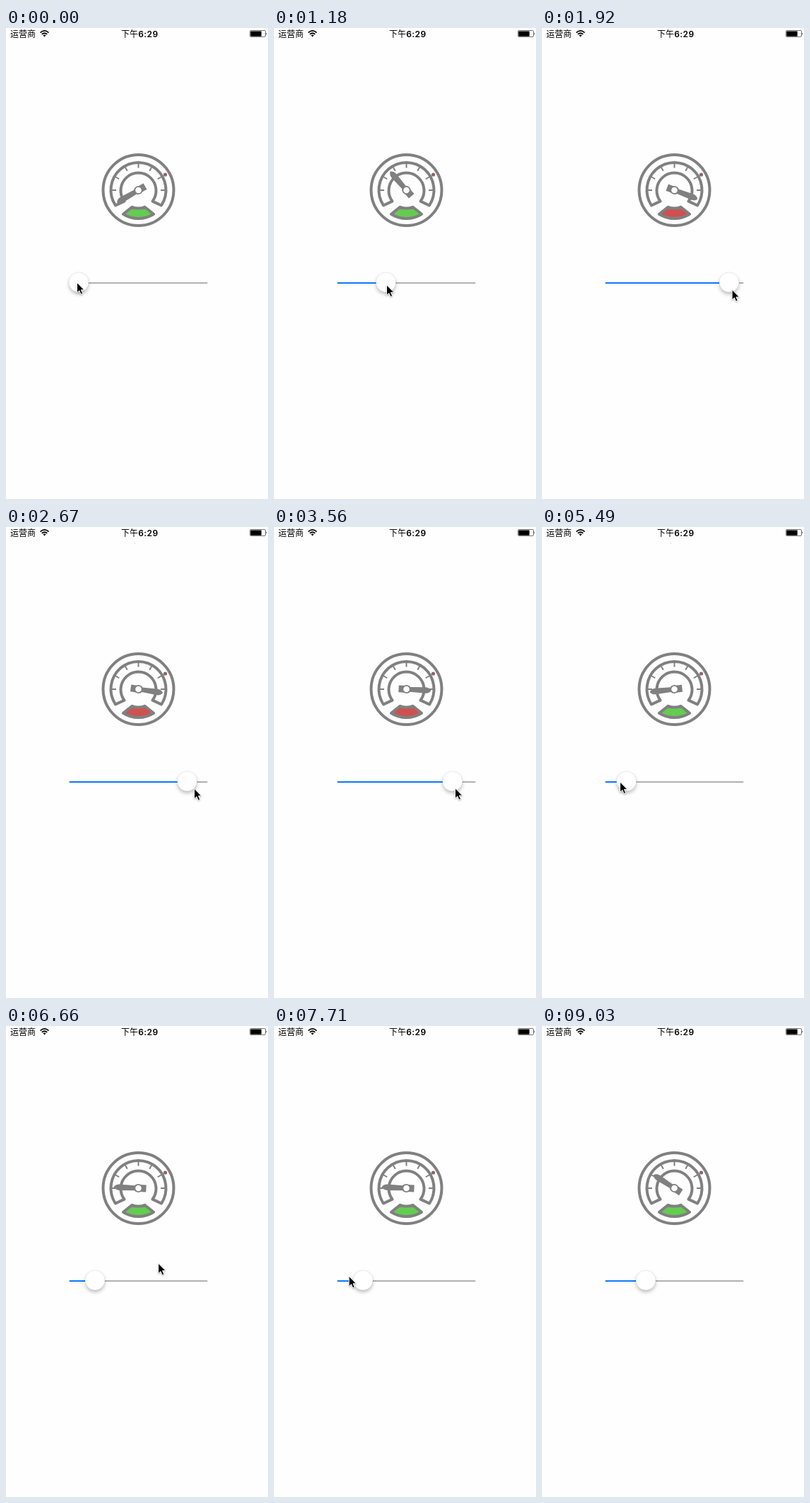
An HTML page that plays this animation: 371 by 665 pixels, repeating every 9650 ms.

```html
<!DOCTYPE html>
<html lang="zh">
<head>
<meta charset="utf-8">
<title>Gauge slider</title>
<style>
  html, body { margin: 0; width: 100%; height: 100%; overflow: hidden; background: #fefefe; }
  svg { display: block; width: 371px; height: 665px; }
  text { font: 12px "Noto Sans CJK SC", "Noto Sans CJK", sans-serif; }
  .time { font-weight: 500; }
  .digits { font: 600 12px Inter, sans-serif; letter-spacing: .4px; }
  .line { fill: none; stroke: #808080; stroke-width: 4; stroke-linejoin: round; }
  #thumb { filter: drop-shadow(0 3px 2.5px rgba(0, 0, 0, .24)); }
  #cursor { filter: drop-shadow(0 1px 1px rgba(0, 0, 0, .3)); }
</style>
</head>
<body>
<svg viewBox="0 0 371 665">
  <rect width="371" height="665" fill="#fefefe"/>

  <text x="6" y="12.5">运营商</text>
  <g fill="none" stroke="#000" stroke-width="1.8">
    <path d="M48.6 6.6Q54.5 1.2 60.4 6.6M50.8 8.9Q54.5 5.6 58.2 8.9"/>
    <path d="M54.5 12.4L52.4 10.3Q54.5 8.6 56.6 10.3Z" fill="#000" stroke="none"/>
  </g>
  <text class="time" x="163" y="12.5">下午</text>
  <text class="digits" x="187.3" y="12.5">6:29</text>
  <rect x="345.5" y="3.5" width="22" height="9" rx="1.5" fill="none" stroke="#555" stroke-width=".8"/>
  <rect x="346.3" y="4.4" width="15.4" height="7.3" rx=".6"/>
  <path d="M368.5 6.3q1.6 1.7 0 3.4z"/>

  <g transform="translate(187.5 229)">
    <circle class="line" r="50"/>
    <path class="line" d="M-32.5 21.5A39 39 0 1 1 32.5 21.5L20 15.6A25 25 0 1 0 -20 15.6Z"/>
    <g id="ticks" stroke="#808080" stroke-width="2"></g>
    <path id="lamp" class="line" d="M-21.5 33.8A40 40 0 0 0 21.5 33.8L9 23.8A25.4 25.4 0 0 1 -9 23.8Z"/>
    <circle cx="38" cy="-22" r="2.6" fill="#8e666b"/>
    <path id="needle" fill="#808080" d="M0-35C2.6-33.5 4.4-30.5 4.3-27L3.4-5L5-4V11H-5V-4L-3.4-5L-4.3-27C-4.4-30.5-2.6-33.5 0-35Z"/>
    <circle r="5.2" fill="#fefefe" stroke="#808080" stroke-width="1.8"/>
  </g>

  <rect x="89.5" y="359" width="196" height="2" rx="1" fill="#b2b2b2"/>
  <rect id="fill" x="89.5" y="359" height="2" rx="1" fill="#0a7aff"/>
  <circle id="thumb" cy="359" r="14" fill="#fff" stroke="#000" stroke-opacity=".13" stroke-width=".6"/>
  <path id="cursor" d="M0 0V14.5L3.3 11.4L5.6 16.6L8.1 15.5L5.9 10.5H10.4Z" stroke="#fff" stroke-width="1"/>
</svg>
<script>
const $ = id => document.getElementById(id);
const LOOP = 9650, START = 585, STEP = 148.07;
const MIN = 103, MAX = 271.5, LIMIT = 0.75;
const LAG = 0.3, GRIP = 2.5;                  // thumb trails the hand
const RELEASE = 40, GRAB = 49, LEAVE = 52;    // in steps

// where the hand turns: step, x
const turns = [
  [-1, 100.5], [4, 159.5], [10, 291], [11, 291], [12.6, 208],
  [14.5, 287.5], [18, 215], [21.5, 287.5], [23.5, 225], [25.7, 286.6],
  [28, 86.5], [31.2, 150], [34.8, 71], [37, 339], [RELEASE, 123.5],
  [42.5, 354], [46.5, 80], [GRAB, 123.5], [LEAVE, 144.5], [54, 354]
];

const clamp = (v, lo, hi) => Math.min(hi, Math.max(lo, v));

function handX(step) {
  const n = turns.findIndex(k => k[0] >= step);
  if (n < 0) return turns[turns.length - 1][1];
  if (n === 0) return turns[0][1];
  const [s0, x0] = turns[n - 1], [s1, x1] = turns[n];
  return x0 + (x1 - x0) * (step - s0) / (s1 - s0);
}

// drifts along the track, lifts off while free, falls away at the end
function handY(step, x) {
  const free = clamp((step - RELEASE) / (GRAB - RELEASE), 0, 1);
  const lift = 36 * Math.sin(Math.PI * Math.sqrt(free));
  const drop = 13 * Math.max(0, step - LEAVE) ** 2;
  return 353.3 + 0.06 * x - lift + drop;
}

function thumbX(step) {
  const t = step - LAG;
  const held = t < GRAB ? Math.min(t, RELEASE) : Math.min(t, LEAVE);
  return clamp(handX(held) + GRIP, MIN, MAX);
}

for (let a = -90; a <= 90; a += 30) {
  $("ticks").insertAdjacentHTML("beforeend", `<path d="M0-31.5V-38" transform="rotate(${a})"/>`);
}

function draw(now) {
  const step = Math.max(-1, Math.floor((now % LOOP - START) / STEP));
  const x = handX(step), thumb = thumbX(step);
  const value = (thumb - MIN) / (MAX - MIN);
  $("thumb").setAttribute("cx", thumb);
  $("fill").setAttribute("width", thumb - 89.5);
  $("needle").setAttribute("transform", `rotate(${value * 240 - 120})`);
  $("lamp").style.fill = value > LIMIT ? "#d05050" : "#64cc50";
  $("cursor").setAttribute("transform", `translate(${x} ${handY(step, x)})`);
}

function tick() {
  draw(performance.now());
  requestAnimationFrame(tick);
}
tick();
</script>
</body>
</html>
```
